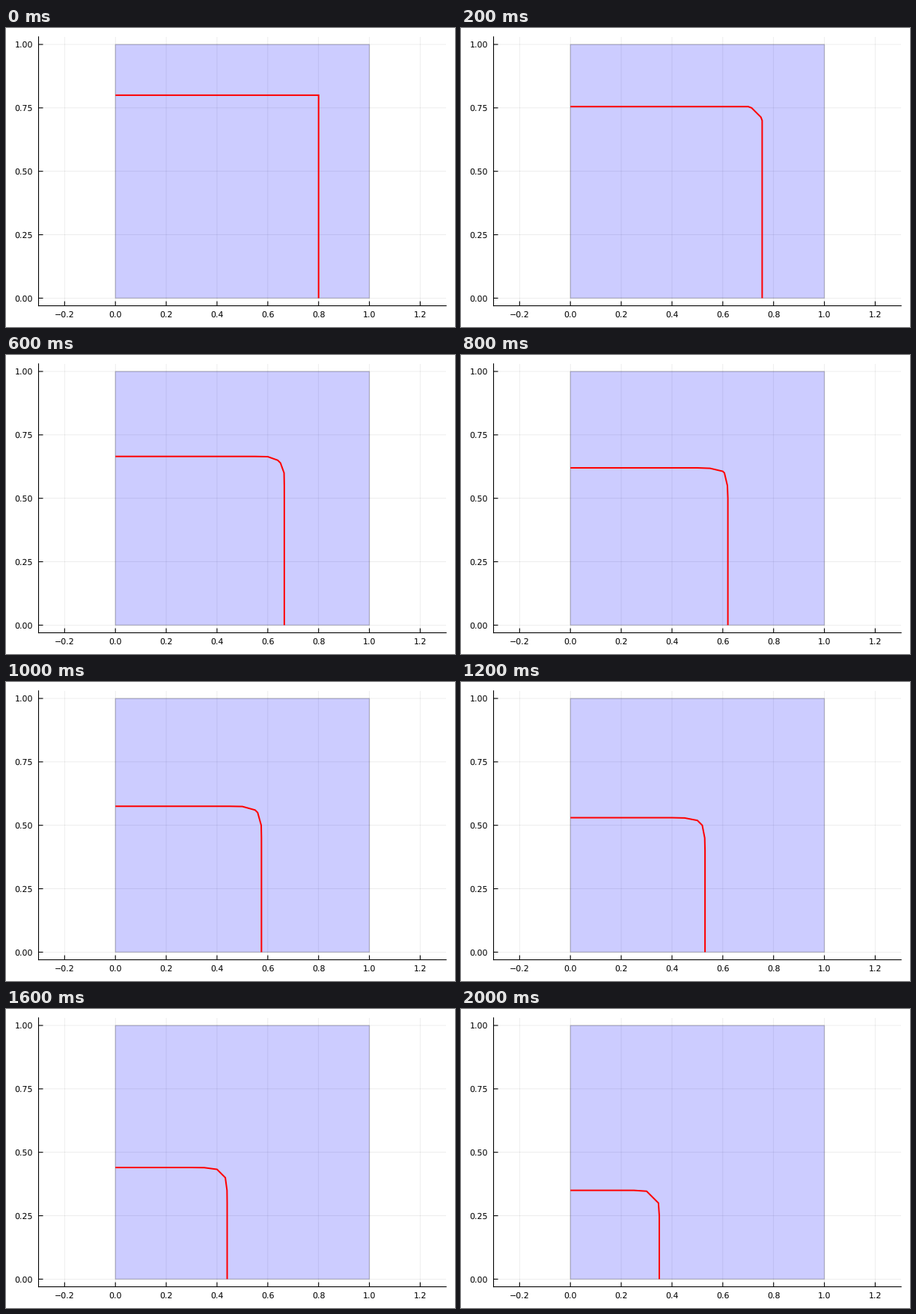
A matplotlib script that plays this animation: 600x400 px, repeating every 2.2 s.

```python
import numpy as np
import matplotlib.pyplot as plt
from matplotlib.animation import FuncAnimation
from matplotlib.patches import Rectangle

W, H, DPI = 600, 400, 100
PX = 72 / DPI                      # points per pixel
SCALE, X0, Y0 = 339.4, 146.2, 361.4  # pixels per unit, position of (0, 0)
LEFT, RIGHT, TOP, BOTTOM = 43.5, 588.2, 11.8, 371.6

STEPS, STEP_MS = 11, 200
CELL, DT, START = 0.05, 0.045, 0.8

plt.rcParams.update({
    "font.family": "DejaVu Sans",
    "font.size": 8,
    "text.hinting": "none",
    "text.hinting_factor": 1,
})


def to_x(px):
    return (px - X0) / SCALE


def to_y(py):
    return (Y0 - py) / SCALE


grid = np.arange(21) * CELL


def advance(phi):
    """One explicit upwind step of phi_t = |grad phi|."""
    dx = np.diff(phi, axis=0, append=phi[-1:] + CELL) / CELL
    dy = np.diff(phi, axis=1, append=phi[:, -1:] + CELL) / CELL
    return phi + DT * np.hypot(np.maximum(dx, 0), np.maximum(dy, 0))


def front(step):
    """Zero level of phi, found along every grid line."""
    phi = np.maximum.outer(grid, grid) - START
    for _ in range(step):
        phi = advance(phi)
    phi = np.round(phi, 10)
    pts = [(x, np.interp(0, col, grid)) for x, col in zip(grid, phi) if col[0] <= 0]
    pts += [(y, x) for x, y in pts]
    pts.sort(key=lambda p: p[0] - p[1])
    return np.array(pts).T


fig = plt.figure(figsize=(W / DPI, H / DPI), dpi=DPI, facecolor="white")
ax = fig.add_axes([LEFT / W, 1 - BOTTOM / H, (RIGHT - LEFT) / W, (BOTTOM - TOP) / H])
ax.set_xticks([])
ax.set_yticks([])
for side, spine in ax.spines.items():
    spine.set_visible(side in ("left", "bottom"))
    spine.set_linewidth(1.1 * PX)
    spine.set_snap(False)

x_lo, x_hi, y_lo, y_hi = to_x(LEFT), to_x(RIGHT), to_y(BOTTOM), to_y(TOP)
x_ticks = np.arange(-1, 7) / 5
y_ticks = np.arange(5) / 4
tick = 6 / SCALE

faint = dict(colors="black", alpha=0.1, linewidths=0.67 * PX, snap=False, zorder=1)
dark = dict(colors="black", linewidths=1.1 * PX, snap=False, zorder=4)
ax.vlines(x_ticks, y_lo, y_hi, **faint)
ax.hlines(y_ticks, x_lo, x_hi, **faint)
ax.vlines(x_ticks, y_lo, y_lo + tick, **dark)
ax.hlines(y_ticks, x_lo, x_lo + tick, **dark)

for x in x_ticks:
    label = f"{x:.1f}".replace("-", "\u2212")
    ax.text(x, to_y(387), label, ha="center", va="baseline")
for y in y_ticks:
    ax.text(to_x(36), y - 4.2 / SCALE, f"{y:.2f}", ha="right", va="baseline")

ax.add_patch(Rectangle((0, 0), 1, 1, facecolor=(0, 0, 1, 0.2), edgecolor=(0, 0, 0, 0.2),
                       linewidth=1.4 * PX, snap=False, zorder=2))
curve, = ax.plot([], [], color="red", linewidth=2 * PX, solid_capstyle="butt",
                 solid_joinstyle="miter", snap=False, zorder=3)
ax.set_xlim(x_lo, x_hi)
ax.set_ylim(y_lo, y_hi)


def draw(step):
    curve.set_data(*front(step))
    return curve,


anim = FuncAnimation(fig, draw, frames=STEPS, interval=STEP_MS, repeat=True,
                     repeat_delay=0, blit=False)
plt.show()
```
